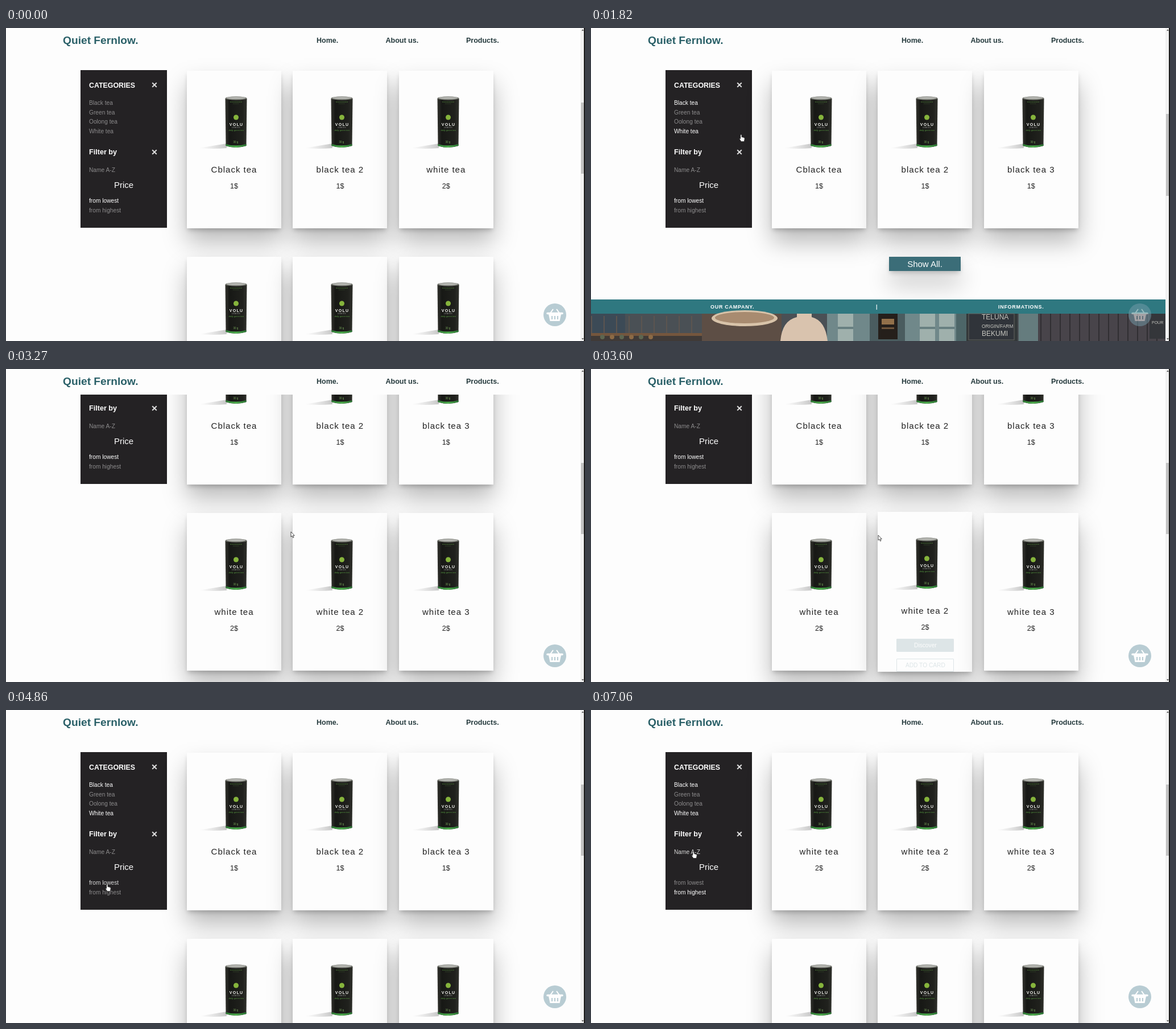
An HTML page for the animation above (7140 ms loop, 1018 by 550 pixels).

```html
<!DOCTYPE html>
<html lang="en">
<head>
<meta charset="utf-8">
<title>Tea shop</title>
<style>
html, body { margin: 0; width: 100%; height: 100%; overflow: hidden; background: #fdfdfd; }
body { font-family: "Liberation Sans", Arial, sans-serif; }
div, svg { position: absolute; }
svg { overflow: visible; }
#stage { width: 1018px; height: 550px; overflow: hidden; background: #fdfdfd; }
.label { line-height: 20px; white-space: pre; }
.side { left: 131px; top: 74px; width: 152px; height: 277px; background: #242224; }
.card { width: 166px; background: #fdfdfd;
  box-shadow: 0 24px 40px rgba(0,0,0,.27), 0 5px 8px -2px rgba(0,0,0,.22); }
.button { left: 33px; width: 99px; height: 21px; border: 1px solid #41707c; border-radius: 1px;
  font-size: 10.2px; line-height: 21px; text-align: center; color: #41707c; }
.filled { background: #41707c; color: #fff; }
.show { left: 524px; top: 0; width: 126px; height: 25px; background: #3b6d78; color: #fff;
  font-size: 15px; line-height: 25px; text-align: center;
  box-shadow: 0 24px 40px rgba(0,0,0,.24), 0 5px 8px -2px rgba(0,0,0,.22); }
.bar { left: 0; top: 75px; width: 1010px; height: 25px; background: #2f7880; }
.header { left: 0; top: 0; width: 1010px; height: 45px; background: #fdfdfd; }
</style>
</head>
<body>
<div id="stage"></div>
<script>
const LOOP = 7140, ROW = 327, CARD_H = 277;
const stage = document.getElementById('stage');

function add(parent, className, html = '', css = '') {
  const el = document.createElement('div');
  el.className = className;
  el.innerHTML = html;
  el.style.cssText = css;
  return parent.appendChild(el);
}
// y is the middle of the capitals
function label(parent, x, y, text, size, css = '') {
  return add(parent, 'label', text, `left:${x}px;top:${y - 10}px;font-size:${size}px;${css}`);
}
function art(parent, x, y, body) {
  return add(parent, '', `<svg width="1" height="1">${body}</svg>`, `left:${x}px;top:${y}px`);
}

const canArt = `
  <defs>
    <linearGradient id="tin"><stop offset="0" stop-color="#34342f"/><stop offset=".2" stop-color="#171815"/>
      <stop offset=".8" stop-color="#20211d"/><stop offset="1" stop-color="#30312c"/></linearGradient>
    <linearGradient id="band"><stop offset="0" stop-color="#2d7a35"/><stop offset=".5" stop-color="#4fae4e"/>
      <stop offset="1" stop-color="#2b7434"/></linearGradient>
    <linearGradient id="cast"><stop offset="0" stop-color="#bbb" stop-opacity="0"/>
      <stop offset="1" stop-color="#999" stop-opacity=".55"/></linearGradient>
  </defs>
  <path d="M-46 91 L3 83 V91 Q-20 93 -46 91Z" fill="url(#cast)"/>
  <path d="M.5 4 L1.500 87 Q19 93 37.500 87 L38.500 4Z" fill="url(#tin)"/>
  <path d="M1.500 84 Q19 89 37.500 84 V87 Q19 93 1.500 87Z" fill="url(#band)"/>
  <ellipse cx="19.500" cy="3.500" rx="19" ry="3.200" fill="#74766f"/>
  <ellipse cx="19.500" cy="3" rx="16.500" ry="2" fill="#b4b5b0"/>
  <path d="M9 10 H30" stroke="#4d7d38" stroke-width="1" stroke-dasharray="2 .7"/>
  <path d="M14 13 H25" stroke="#3a552f" stroke-width=".8" stroke-dasharray="1.500 .7"/>
  <circle cx="19.500" cy="37" r="4.500" fill="#86b43c"/>
  <g text-anchor="middle" font-family="Liberation Sans, sans-serif">
    <text x="20" y="51.500" font-size="7" font-weight="bold" letter-spacing="1.300" fill="#f4f4f0">VOLU</text>
    <text x="19.500" y="56" font-size="3" letter-spacing=".7" fill="#aaa">LEAVES</text>
    <text x="19.500" y="61" font-size="4" font-style="italic" fill="#579a42">daily green tea</text>
    <text x="19" y="82" font-size="4.500" fill="#78a95b">30 g</text>
  </g>`;

const page = add(stage, '');
const side = add(page, 'side');
const cross = '<path d="M-3.800 -3.800 L3.800 3.800 M3.800 -3.800 L-3.800 3.800" stroke="#ddd" stroke-width="2"/>';
label(side, 15, 27, 'CATEGORIES', 12.4, 'font-weight:bold;color:#fff');
label(side, 15, 144, 'Filter by', 12.6, 'font-weight:bold;color:#fff');
label(side, 59, 202, 'Price', 15, 'color:#fff');
art(side, 129.5, 26, cross);
art(side, 129.5, 144, cross);
const option = (text, y) => label(side, 15, y, text, 10.2);
const options = {
  black: option('Black tea', 58), green: option('Green tea', 75),
  oolong: option('Oolong tea', 91), white: option('White tea', 108),
  name: option('Name A-Z', 176), lowest: option('from lowest', 230), highest: option('from highest', 247)
};

const cards = Array.from({length: 6}, (_, i) => {
  const left = 318 + 186.4 * (i % 3), top = 75 + ROW * Math.floor(i / 3);
  const box = add(page, 'card', '', `left:${left}px`);
  art(box, 67, 45, canArt);
  const title = label(box, 0, 174, '', 15, 'width:166px;text-align:center;letter-spacing:1px;color:#222');
  const price = label(box, 0, 203, '', 12.5, 'width:166px;text-align:center;color:#222');
  const buttons = add(box, '',
    '<div class="button filled" style="top:223px">Discover</div><div class="button" style="top:258px">ADD TO CARD</div>');
  return {box, title, price, buttons, top};
});

const footer = add(page, '');
add(footer, 'show', 'Show All.');
const bar = add(footer, 'bar');
const caption = 'font-weight:bold;color:#fff;letter-spacing:.7px';
label(bar, 210, 13, 'OUR CAMPANY.', 9, caption);
label(bar, 501, 13, '|', 9, caption);
label(bar, 716, 13, 'INFORMATIONS.', 9, caption);

const rect = (x, y, w, h, fill, extra = '') =>
  `<rect x="${x}" y="${y}" width="${w}" height="${h}" fill="${fill}" ${extra}/>`;
function cafe() {
  let s = rect(0, 0, 1010, 260, '#4a5055') + rect(0, 0, 60, 34, '#3c4a56');
  for (let i = 0; i < 9; i++) s += rect(i * 22, 4, 2, 30, '#5c5550');
  s += rect(0, 34, 210, 5, '#74563d') + rect(0, 39, 210, 220, '#403a37');
  for (let i = 0; i < 6; i++) s += `<circle cx="${20 + i * 17}" cy="41" r="4" fill="${i % 2 ? '#8c6a45' : '#5d6650'}"/>`;
  s += rect(195, 0, 140, 260, '#5d4e45');
  s += '<ellipse cx="270" cy="8" rx="58" ry="14" fill="#d8c3a9"/><ellipse cx="270" cy="7" rx="52" ry="10" fill="#a88b70"/>';
  s += rect(415, 0, 270, 260, '#70888a');
  s += '<path d="M333 48 Q336 12 362 6 V0 H388 V6 Q412 12 416 48 V260 H333Z" fill="#d9c3ae"/>';
  for (const x of [434, 578, 612]) s += rect(x, 0, 27, 260, '#9fb0ac') + rect(x, 23, 27, 4, '#677f81');
  s += rect(490, 0, 62, 260, '#4a5c5f') + rect(505, 0, 34, 45, '#251f1b') + rect(511, 9, 22, 10, '#92704a') + rect(511, 24, 22, 3, '#6f553b');
  s += rect(642, 0, 18, 260, '#4d6668') + rect(660, 0, 90, 260, '#333839');
  s += rect(664, 0, 80, 46, '#30343a', 'stroke="#646460"');
  s += rect(752, 0, 34, 260, '#657c7e') + rect(786, 0, 224, 260, '#48444a');
  for (let i = 0; i < 13; i++) s += rect(790 + i * 17, 0, 2, 260, '#302e32');
  s += rect(982, 0, 28, 44, '#34363a');
  const chalk = (x, y, size, text) => `<text x="${x}" y="${y}" font-size="${size}" fill="#c6c6bf">${text}</text>`;
  return s + chalk(687, 10, 12, 'TELUNA') + chalk(687, 25, 8.4, 'ORIGIN/FARM') + chalk(687, 39, 12, 'BEKUMI') + chalk(986, 18, 7, 'POUR');
}
art(footer, 0, 100, cafe());

const header = add(stage, 'header');
label(header, 100, 22, 'Quiet Fernlow.', 19.2, 'font-weight:bold;color:#2a6068');
[['Home.', 546], ['About us.', 667.5], ['Products.', 809]].forEach(([text, x]) =>
  label(header, x, 22, text, 12.5, 'font-weight:bold;color:#24393c'));

art(stage, 964.5, 504, `<g opacity=".5"><circle r="20" fill="#759dab"/>
  <g fill="none" stroke="#fff"><path d="M-8 -3 L-3 -10 M8 -3 L3 -10" stroke-width="2"/>
  <path d="M-13 -2.500 H13" stroke-width="3.500" stroke-linecap="round"/></g>
  <path fill="#fff" fill-rule="evenodd" d="M-11 -1 H11 L8.500 11 H-8.500Z M-6 2 V8 H-4 V2Z M-1 2 V8 H1 V2Z M4 2 V8 H6 V2Z"/></g>`);

add(stage, '', '', 'left:1010px;top:0;width:8px;height:550px;background:#f1f1f1');
const thumb = add(stage, '', '', 'left:1011px;width:5px;background:#c1c1c1');
add(stage, '', '', 'left:1016px;top:0;width:2px;height:550px;background:#1c1c1c');
art(stage, 1013.5, 0, '<path d="M-2 5 L0 2 L2 5Z M-2 545 L0 548 L2 545Z" fill="#666"/>');

const arrow = art(stage, 0, 0,
  '<path d="M0 0 V9 L2 7.200 L3.500 10.500 L5 9.800 L3.600 6.700 H6.300Z" fill="#fff" stroke="#222" stroke-width=".8"/>');
const hand = art(stage, 0, 0, `<path d="M-1.200 6 V1 Q0 -.8 1 1 V4.500 L5 5.500 Q6.500 6 6.200 8 L5.200 12.500 H0 L-3 8
  Q-3.200 6.500 -1.200 7.500Z" fill="#fff" stroke="#222" stroke-width=".7"/>`);

// The wheel moves the page in two notches of 74.5px each way
const scrollKeys = [[2980, 0], [3240, 149], [3990, 149], [4020, 144], [4200, 74.5], [4360, 74.5], [4560, 0]];
const cursorKeys = [
  [150, 640, 550], [750, 193, 152], [900, 172, 130], [1300, 172, 130], [1550, 180, 182], [1720, 182, 182],
  [1820, 264, 187], [2400, 498, 284], [3270, 501, 286], [3600, 505, 292], [4020, 503, 293], [4360, 490, 300],
  [4780, 178, 306], [5100, 178, 306], [5350, 180, 321], [6200, 180, 321], [6850, 180, 248]
];
const hovers = [['oolong', 600, 770], ['green', 770, 860], ['black', 860, 1000], ['white', 1450, 1700],
  ['lowest', 4720, 5250], ['highest', 5250, 5450], ['name', 6700, LOOP]];
const clicks = {black: 1000, white: 1700, highest: 5450};
const BLACK = ['Cblack tea', 'black tea 2', 'black tea 3'], WHITE = ['white tea', 'white tea 2', 'white tea 3'];
const within = (t, from, to) => t >= from && t < to;
const clamp = v => Math.max(0, Math.min(1, v));

// Eased value of each channel between its surrounding keys
function follow(keys, t) {
  const next = keys.findIndex(k => k[0] > t);
  if (next === 0) return keys[0].slice(1);
  if (next < 0) return keys[keys.length - 1].slice(1);
  const a = keys[next - 1], b = keys[next];
  const u = (t - a[0]) / (b[0] - a[0]), e = u * u * (3 - 2 * u);
  return a.slice(1).map((v, i) => v + (b[i + 1] - v) * e);
}
// New results arrive some time after each click
function productsAt(t) {
  if (t < 1250) return [BLACK[0], BLACK[1], WHITE[0], BLACK[2], WHITE[1], WHITE[2]];
  if (t < 2300) return BLACK;
  return t < 5750 ? [...BLACK, ...WHITE] : [...WHITE, ...BLACK];
}

function render(t) {
  const [scroll] = follow(scrollKeys, t);
  page.style.top = -scroll + 'px';

  const products = productsAt(t), short = products.length === 3;
  cards.forEach((card, i) => {
    const name = products[i];
    card.box.style.display = name ? '' : 'none';
    if (!name) return;
    card.title.textContent = name;
    card.price.textContent = name.startsWith('white') ? '2$' : '1$';
    const lift = i === 4 ? clamp((t - 3560) / 250) * clamp((4420 - t) / 250) : 0;
    card.box.style.top = card.top - 12.5 * lift + 'px';
    card.box.style.height = CARD_H + 25 * lift + 'px';
    card.buttons.style.opacity = lift;
  });
  footer.style.top = 402 + (short ? 0 : ROW) + 'px';
  thumb.style.top = (short ? 151 : 131 + scroll * 0.228) + 'px';
  thumb.style.height = (short ? 144 : 125) + 'px';

  const active = {black: t >= clicks.black, white: t >= clicks.white,
    lowest: t < clicks.highest, highest: t >= clicks.highest};
  for (const key in options) {
    const hovered = hovers.some(([k, from, to]) => k === key && within(t, from, to));
    options[key].style.color = hovered ? '#d8d8d8' : active[key] ? '#fff' : '#8c8b8c';
  }

  const [x, y] = follow(cursorKeys, t);
  const pointing = within(t, 780, 1850) || t >= 4680;
  for (const [el, shown] of [[arrow, !pointing && t >= 150], [hand, pointing]]) {
    el.style.display = shown ? '' : 'none';
    el.style.left = x + 'px';
    el.style.top = y + 'px';
  }
}

const start = performance.now();
function tick() {
  render((performance.now() - start) % LOOP);
  requestAnimationFrame(tick);
}
tick();
</script>
</body>
</html>
```
